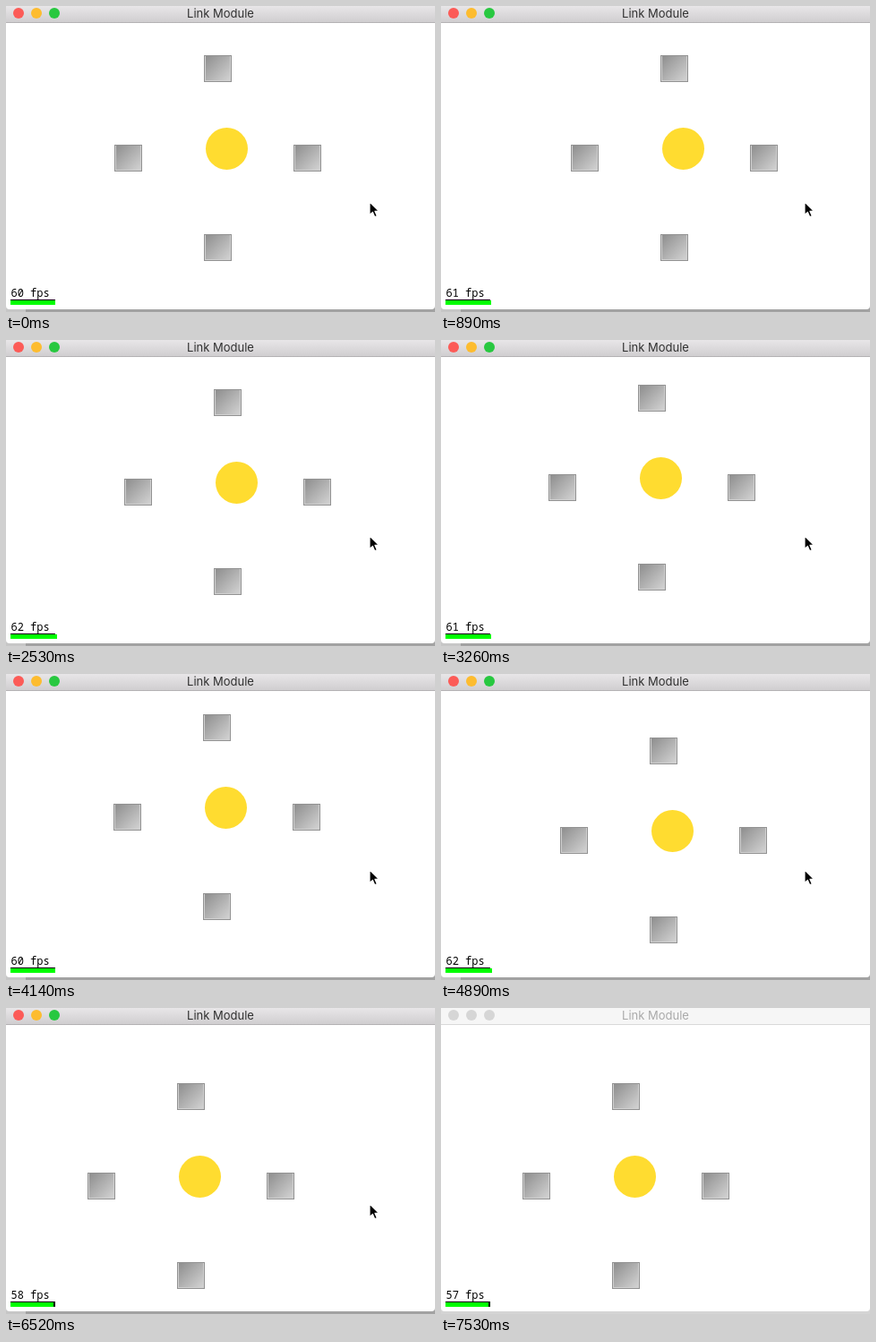
These frames come from a looping animation (479 by 342 pixels, 7.63 s). An HTML page:

```html
<!DOCTYPE html>
<html lang="en">
<head>
<meta charset="utf-8">
<title>Link Module</title>
<style>
  html, body { margin: 0; width: 100%; height: 100%; overflow: hidden; background: #fff; }
  svg { display: block; width: 479px; height: 342px; }
  .title { font: 13px Inter, Roboto, sans-serif; text-anchor: middle; fill: #303030; }
  .fps { font: 500 12px "Noto Sans Mono", "DejaVu Sans Mono", monospace; }
  .bar { fill: url(#chrome); }
  .edge { fill: #b4b2b4; }
  .red { fill: #fc5b57; }
  .amber { fill: #fdbc2f; }
  .green { fill: #28c840; }
  .shade { fill: #a2a2a2; }
  .corner { fill: #c6c6c6; }
  .idle .bar { fill: #f6f6f6; }
  .idle .edge { fill: #d9d9d9; }
  .idle .title { fill: #a9a9a9; }
  .idle .buttons circle { fill: #d6d6d6; }
  .idle .shade, .idle .corner { fill: #d4d4d4; }
</style>
</head>
<body>
<svg id="stage" viewBox="0 0 479 342">
  <defs>
    <linearGradient id="chrome" x2="0" y2="1">
      <stop stop-color="#e8e6e8"/><stop offset="1" stop-color="#d0ced0"/>
    </linearGradient>
    <linearGradient id="metal" x2="1" y2="1">
      <stop stop-color="#8e8e8e"/><stop offset="1" stop-color="#d2d2d2"/>
    </linearGradient>
    <g id="tile">
      <rect width="31" height="30" fill="#929292"/>
      <rect x="1" y="1" width="29" height="28" fill="#d0d0d0"/>
      <rect x="2" y="1" width="27" height="27" fill="url(#metal)"/>
    </g>
  </defs>

  <rect class="shade" y="330" width="479" height="12"/>
  <rect class="corner" y="330" width="22" height="12"/>
  <rect y="-10" width="479" height="349" rx="4" fill="#fff"/>

  <rect class="bar" width="479" height="18"/>
  <rect class="edge" y="18" width="479" height="1"/>
  <g class="buttons">
    <circle class="red" cx="14" cy="8" r="6"/>
    <circle class="amber" cx="34" cy="8" r="6"/>
    <circle class="green" cx="54" cy="8" r="6"/>
  </g>
  <text class="title" x="239.5" y="13">Link Module</text>

  <g id="nodes">
    <use href="#tile"/>
    <use href="#tile" x="-100" y="100"/>
    <use href="#tile" x="100" y="100"/>
    <use href="#tile" y="200"/>
    <circle cx="25.5" cy="104.5" r="23.5" fill="#ffdc30"/>
  </g>

  <text class="fps" id="fps" x="5.5" y="325"></text>
  <rect x="5" y="328" width="50" height="6"/>
  <rect id="meter" x="5" y="329" height="5" fill="#0f0"/>

  <path id="cursor" d="M0 0V14.5L3.4 11.4 5.7 16.7 8.3 15.6 6 10.4H10.4Z"
        stroke="#fff" stroke-width="1.2" stroke-linejoin="round"/>
</svg>
<script>
const $ = id => document.getElementById(id);
const LOOP = 7630, STEP = 147.6, IDLE_AT = 51 * STEP;
const SPEED = 0.052; // px per ms while a key is held

// Each key press: start time, then the distance covered in x and y
const moves = [
  [420, 44, 0], [1880, -45, 0], [3150, 0, -25], [3845, 0, 41],
  [4612, 19, 0], [5130, 0, 13], [5448, -48, 0]
];
const fpsDrift = [[0, 60], [1930, 63], [3260, 61], [4140, 60], [4890, 62], [5780, 59], [7260, 57]];
const cursorExit = [[6500, 0], [7100, 1]];

function at(keys, t) {
  const n = keys.findIndex(k => k[0] > t);
  if (n === 0) return keys[0][1];
  if (n < 0) return keys[keys.length - 1][1];
  const [t0, a] = keys[n - 1], [t1, b] = keys[n];
  return a + (b - a) * (t - t0) / (t1 - t0);
}

function nodesAt(t) {
  let x = 221, y = 55;
  for (const [start, dx, dy] of moves) {
    const length = Math.abs(dx + dy);
    const done = Math.min(1, Math.max(0, (t - start) * SPEED / length));
    x += dx * done;
    y += dy * done;
  }
  return [x, y];
}

function place(id, [x, y]) {
  $(id).setAttribute("transform", `translate(${Math.round(x)} ${Math.round(y)})`);
}

function draw() {
  const now = performance.now() % LOOP;
  const t = Math.floor(now / STEP) * STEP;
  const exit = at(cursorExit, t);
  const rate = Math.round(at(fpsDrift, t));
  place("nodes", nodesAt(t));
  place("cursor", [406 + 81 * exit, 219 + 130 * exit]);
  $("fps").textContent = rate + " fps";
  $("meter").setAttribute("width", Math.round(rate * 50 / 60));
  $("stage").classList.toggle("idle", t >= IDLE_AT);
  requestAnimationFrame(draw);
}
draw();
</script>
</body>
</html>
```
